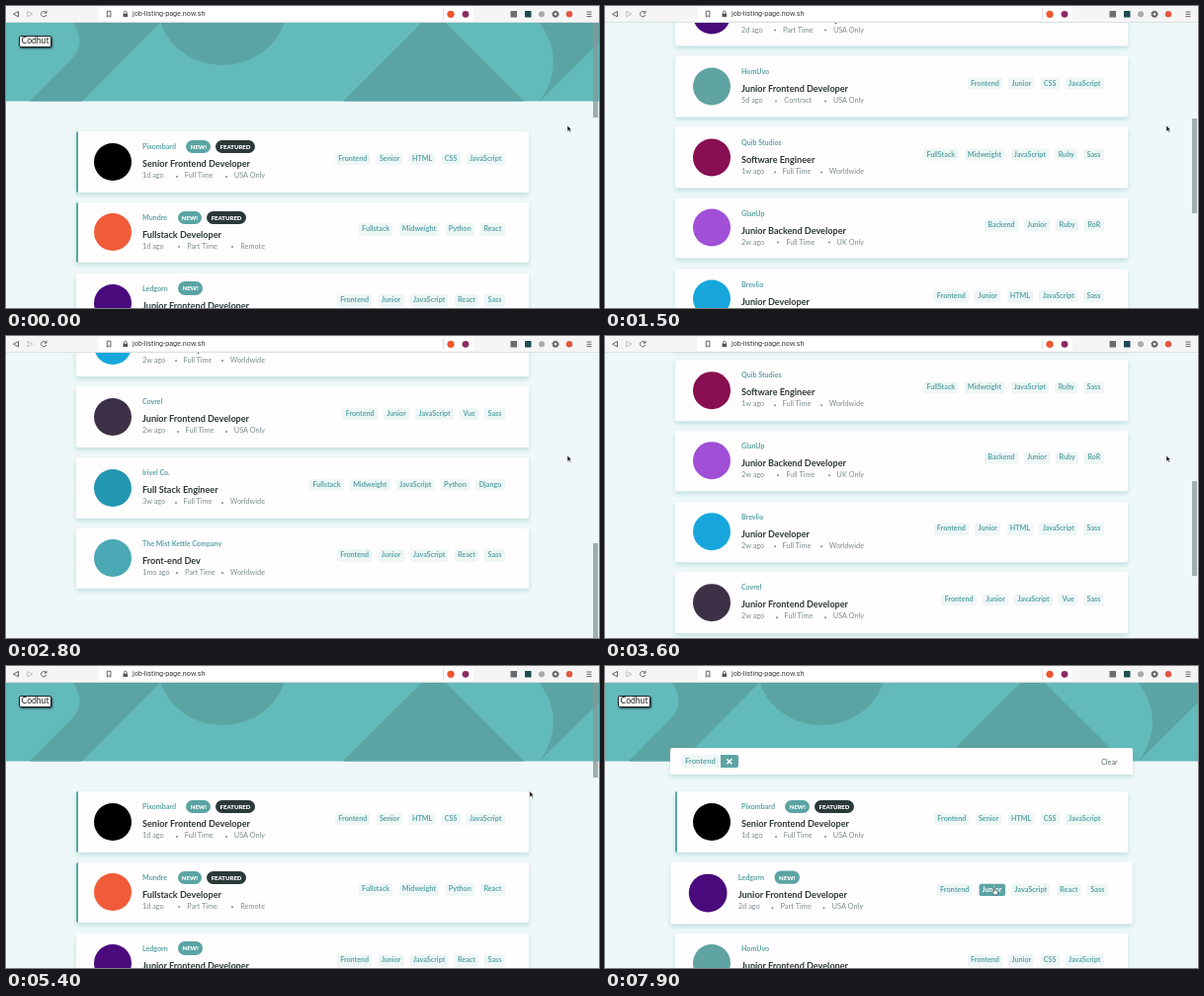
Write an HTML page that moves like this. It is 600 px wide and 306 px high and loops after 8000 ms.

```html
<!DOCTYPE html>
<html lang="en">
<head>
<meta charset="utf-8">
<title>Job listing</title>
<style>
html, body { margin: 0; width: 100%; height: 100%; overflow: hidden; }
#stage { position: relative; width: 600px; height: 306px; overflow: hidden; background: #eef8f8; font-family: Lato, sans-serif; }
#stage * { box-sizing: border-box; }
#page { position: absolute; left: 0; top: 0; width: 600px; height: 884px; }
svg { position: absolute; left: 0; top: 0; }
.repo { position: absolute; left: 13px; top: 30px; width: 33px; height: 12px; border: 1.3px solid #1c2626; border-radius: 2px;
  background: #fff; color: #222; font-size: 8.6px; line-height: 9.5px; text-align: center; box-shadow: 1px 1px 2px #234; }
.card { position: absolute; left: 71px; width: 458px; height: 61.5px; background: #fffdfe; border-radius: 2px; box-shadow: 0 2.5px 4px rgba(91,164,164,.3); }
.card.hot { border-left: 2px solid #5ba4a4; }
.card > * { position: absolute; white-space: nowrap; }
.hot > * { margin-left: -2px; }
.logo { left: 18px; top: 11.5px; width: 38px; height: 38px; border-radius: 50%; }
.firm { left: 67px; top: 8.5px; height: 14px; display: flex; align-items: center; color: #5ba4a4; font-weight: 700; font-size: 7.1px; }
.pill { height: 13.5px; padding: 0 4.3px; margin-left: 5px; border-radius: 7px; color: #fff; background: #5ba4a4; font-size: 6px; font-weight: 900; line-height: 13.5px; }
.firm span + .pill { margin-left: 10.5px; }
.pill.dark { background: #2b3939; }
.role { left: 67px; top: 26px; line-height: 13px; font-size: 9.1px; font-weight: 700; color: #2b3939; }
.meta { left: 67px; top: 40px; width: 124px; display: flex; justify-content: space-between; font-size: 7.3px; line-height: 10px; color: #7b8e8e; }
.meta span { position: relative; }
.meta span + span::before { content: ""; position: absolute; left: -9px; top: 4.6px; width: 2px; height: 2px; border-radius: 50%; background: #7b8e8e; }
.tags { right: 24.5px; top: 21.5px; display: flex; gap: 6.3px; }
.tag { height: 12.5px; padding: 0 3.2px; border-radius: 2px; background: #eef6f6; color: #5ba4a4; font-size: 7.15px; font-weight: 700; line-height: 12px; }
.tag.on { background: #5ba4a4; color: #fff; }
#bar { position: absolute; left: 66px; top: 83px; width: 467.5px; height: 26.5px; background: #fffdfe; border-radius: 2px; box-shadow: 0 2.5px 4px rgba(91,164,164,.3); }
#bar > * { position: absolute; top: 6.5px; }
#bar .tag { left: 11px; width: 40px; height: 13.5px; line-height: 13px; font-size: 7.6px; padding: 0 4px; }
#bar svg { left: 51px; background: #5ba4a4; border-radius: 0 2px 2px 0; }
#bar b { left: 436px; top: 10px; font-size: 7.3px; line-height: 10px; font-weight: 400; color: #596b6b; }
#thumb { position: absolute; left: 593.5px; width: 5.5px; height: 96px; background: rgba(135,150,150,.75); }
#chrome { position: absolute; left: 0; top: 0; width: 600px; height: 17px; background: #f5f5f6; border-bottom: 1px solid #dcdfe0; }
#chrome span { position: absolute; left: 128px; top: 3px; font: 7.2px/10px Roboto, sans-serif; color: #3b3b3b; }
</style>
</head>
<body>
<div id="stage">
  <div id="page">
    <svg width="600" height="97" viewBox="0 0 600 97">
      <path fill="#63baba" d="M0 0H600V96.500H0Z"/>
      <g fill="#5ba4a4">
        <path d="M68 17Q82 38 66 54L24 96.500H77L156 17Z"/>
        <path d="M154 0A64 59 0 0 0 284 0Z"/>
        <path d="M341 96.500L420.500 17H445L524.500 96.500Z"/>
        <path d="M540 17Q568 56 540 96.500L600 37V17Z"/>
      </g>
    </svg>
    <div class="repo">Codhut</div>
    <div id="list"></div>
    <div id="bar">
      <div class="tag">Frontend</div>
      <svg width="17.500" height="13.500"><path d="M6.300 4.300l5 5m0-5l-5 5" stroke="#fff" stroke-width="1.600"/></svg>
      <b>Clear</b>
    </div>
  </div>
  <div id="thumb"></div>
  <div id="chrome">
    <svg width="600" height="16" fill="none" stroke="#555" stroke-width=".9">
      <path fill="#fff" stroke="none" d="M94 1H473V15H94Z"/>
      <path d="M12.500 5.500v5.400l-5-2.700Z"/>
      <path stroke="#bbb" d="M21.800 5.500v5.400l5-2.700Z"/>
      <path d="M40.600 6.800a2.700 2.700 0 1 0 .2 2.200M41 4.800v2.300h-2.300"/>
      <path d="M102.300 5.200h3.600v6l-1.800-1.500-1.800 1.500Z"/>
      <path fill="#555" stroke="none" d="M118.500 7.800h4.600v3.200h-4.600Z"/>
      <path d="M119.500 8V6.500a1.300 1.300 0 0 1 2.600 0V8"/>
      <path stroke="#ddd" d="M442.500 2V14"/>
      <g stroke="none">
        <circle cx="450" cy="8.300" r="3.600" fill="#ee562e"/>
        <circle cx="465" cy="8.300" r="3.400" fill="#8b2a62"/>
        <path fill="#696d70" d="M510.500 5h6.500v6.500h-6.500Z"/>
        <path fill="#1d4c50" d="M525 5h6.500v6.500h-6.500Z"/>
        <circle cx="542" cy="8.300" r="3" fill="#aaa"/>
        <circle cx="570" cy="8.300" r="3.200" fill="#e4573f"/>
      </g>
      <circle cx="556" cy="8.300" r="2.200" stroke-width="1.500"/>
      <circle cx="556" cy="8.300" r="3.300" stroke-dasharray="1.300 1.300"/>
      <path d="M587.500 6h5M587.500 8.300h5M587.500 10.600h5"/>
    </svg>
    <span>job-listing-page.now.sh</span>
  </div>
  <svg id="mouse" width="12" height="12" overflow="visible">
    <path id="arrow" fill="#111" stroke="#fff" stroke-width=".5" d="M0 0V6.200L1.500 4.900L2.500 7.100L3.500 6.600L2.500 4.500H4.300Z"/>
    <path id="hand" fill="#fff" stroke="#333" stroke-width=".6" d="M-.6 3.600V.4Q0-.5.6.4V2.400L3 3Q3.600 3.300 3.400 4.500L2.700 6.800H-.4L-2 4.400Q-1.800 3.400-.6 4.200Z"/>
  </svg>
</div>
<script>
const $ = id => document.getElementById(id);
const LOOP = 8000, PITCH = 71.75, BOTTOM = 578, CLICK = 7100;

// firm | colour | role | age | contract | place | tags | badges
const jobs = `Pixombard|#000|Senior Frontend Developer|1d ago|Full Time|USA Only|Frontend Senior HTML CSS JavaScript|2
Mundre|#f15c38|Fullstack Developer|1d ago|Part Time|Remote|Fullstack Midweight Python React|2
Ledgorn|#4a0a7c|Junior Frontend Developer|2d ago|Part Time|USA Only|Frontend Junior JavaScript React Sass|1
HomUvo|#5fa3a2|Junior Frontend Developer|5d ago|Contract|USA Only|Frontend Junior CSS JavaScript|0
Quib Studios|#870f52|Software Engineer|1w ago|Full Time|Worldwide|FullStack Midweight JavaScript Ruby Sass|0
GlanUp|#a04fd6|Junior Backend Developer|2w ago|Full Time|UK Only|Backend Junior Ruby RoR|0
Brevlio|#17a7dc|Junior Developer|2w ago|Full Time|Worldwide|Frontend Junior HTML JavaScript Sass|0
Covrel|#3c3146|Junior Frontend Developer|2w ago|Full Time|USA Only|Frontend Junior JavaScript Vue Sass|0
Irivel Co.|#2497b0|Full Stack Engineer|3w ago|Full Time|Worldwide|Fullstack Midweight JavaScript Python Django|0
The Mist Kettle Company|#4aa9b5|Front-end Dev|1mo ago|Part Time|Worldwide|Frontend Junior JavaScript React Sass|0`
  .split("\n").map(row => row.split("|"));

const cards = jobs.map(([firm, colour, role, age, contract, place, tags, badges]) => {
  const el = document.createElement("div");
  el.className = badges == 2 ? "card hot" : "card";
  el.innerHTML = `<div class="logo" style="background:${colour}"></div>
    <div class="firm"><span>${firm}</span>${badges > 0 ? '<i class="pill" style="font-style:normal">NEW!</i>' : ""}${badges > 1 ? '<i class="pill dark" style="font-style:normal">FEATURED</i>' : ""}</div>
    <div class="role">${role}</div>
    <div class="meta"><span>${age}</span><span>${contract}</span><span>${place}</span></div>
    <div class="tags">${tags.split(" ").map(t => `<div class="tag">${t}</div>`).join("")}</div>`;
  $("list").append(el);
  return { el, frontend: tags.startsWith("Frontend"), tags: el.querySelectorAll(".tag") };
});

const ramp = (t, a, b) => Math.min(1, Math.max(0, (t - a) / (b - a)));
const ease = x => x * x * (3 - 2 * x);
const between = (t, a, b) => t >= a && t < b;

function draw(t) {
  const scroll = BOTTOM * (ramp(t, 200, 2780) - ramp(t, 2880, 5095));
  $("page").style.transform = `translateY(${-scroll}px)`;
  $("thumb").style.top = 17 + scroll / 3 + "px";

  const filtered = t >= CLICK;
  $("thumb").style.display = filtered ? "none" : "";
  $("bar").style.opacity = ramp(t, CLICK, CLICK + 250);
  let row = 0;
  for (const { el, frontend } of cards) {
    const shown = !filtered || frontend;
    el.style.display = shown ? "" : "none";
    if (shown) el.style.top = 127 + PITCH * row++ + "px";
  }

  // pointer, hover growth and hovered tags
  const go = ease(ramp(t, 5200, 5950)), down = ease(ramp(t, 7200, 7750));
  const x = 568 - 216 * go + 42 * down, y = 121 + 32 * go + 72 * down;
  const onFirst = between(t, 5850, 7370), onSecond = t >= 7600;
  const grow = (card, k) => card.el.style.transform = `scale(${1 + .02 * k})`;
  grow(cards[0], ease(ramp(t, 5430, 5650)) - ease(ramp(t, 7470, 7650)));
  grow(cards[2], ease(ramp(t, 7520, 7720)));
  cards[0].tags[0].classList.toggle("on", onFirst);
  cards[2].tags[1].classList.toggle("on", onSecond);
  $("mouse").style.transform = `translate(${x}px,${y}px)`;
  $("hand").style.display = onFirst || onSecond ? "" : "none";
  $("arrow").style.display = onFirst || onSecond ? "none" : "";
}

const start = performance.now();
function tick() {
  draw((performance.now() - start) % LOOP);
  requestAnimationFrame(tick);
}
tick();
</script>
</body>
</html>
```
